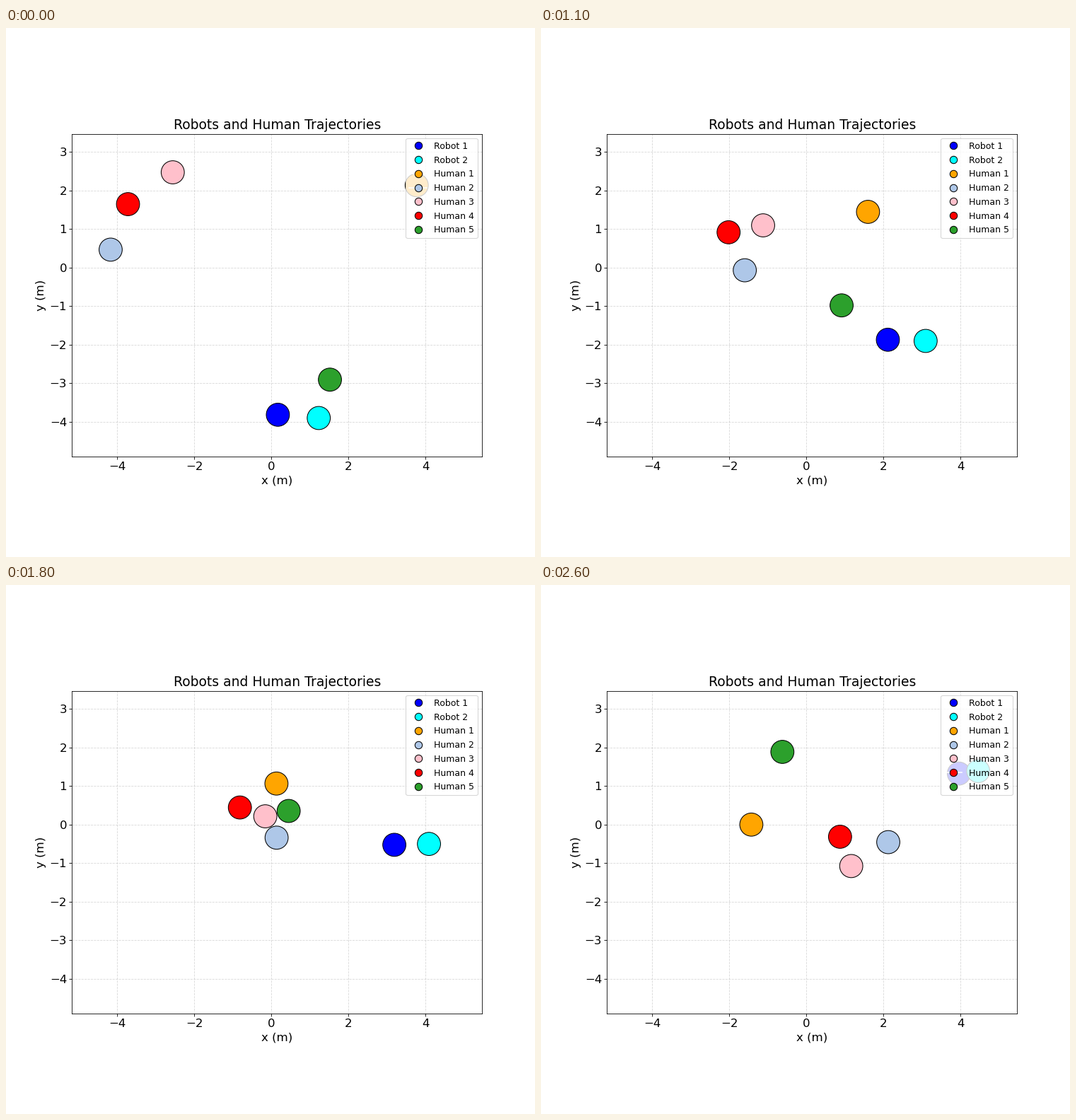
Write a matplotlib script that moves like this. It is 748 by 748 pixels and loops after 2.7 s.

```python
import numpy as np
import matplotlib.pyplot as plt
from matplotlib.animation import FuncAnimation
from matplotlib.lines import Line2D

FRAMES = 27
RADIUS = 0.3
STEP = 0.25                           # metres a robot drives per frame
LAG = 0.6                             # frames a walker loses while starting
DIAGONAL, STEEP, UP = np.radians([45, 67.5, 90])


def drive(start, *legs):
    """Constant-speed path made of (heading, number of steps) legs."""
    heading = np.concatenate([np.full(n, angle) for angle, n in legs])
    moves = STEP * np.column_stack([np.cos(heading), np.sin(heading)])
    return np.vstack([start, start + np.cumsum(moves, axis=0)])


def from_rest(t):
    """Time eased so that speed builds up exponentially from zero."""
    return t - LAG * (1 - np.exp(-t / LAG))


def walk(*points):
    """Smooth path (cubic Hermite) over four key points, starting from rest."""
    p = np.array(points)
    knots = from_rest(np.array([0, 11, 22, 26]))
    v = np.gradient(p, knots, axis=0, edge_order=2)
    t = from_rest(np.arange(FRAMES))
    k = np.clip(np.searchsorted(knots, t, side="right") - 1, 0, len(p) - 2)
    h = (knots[k + 1] - knots[k])[:, None]
    u = (t - knots[k])[:, None] / h
    w = 1 - u
    return (w * w * ((1 + 2 * u) * p[k] + u * h * v[k])
            + u * u * ((1 + 2 * w) * p[k + 1] - w * h * v[k + 1]))


ACTORS = {
    "Robot 1": ("blue", drive((0.17, -3.815), (DIAGONAL, 11), (STEEP, 2),
                              (DIAGONAL, 5), (STEEP, 8))),
    "Robot 2": ("cyan", drive((1.23, -3.9), (DIAGONAL, 10), (STEEP, 4),
                              (DIAGONAL, 5), (UP, 3), (STEEP, 2), (UP, 2))),
    "Human 1": ("orange", walk((3.77, 2.135), (1.60, 1.445),
                               (-0.67, 0.665), (-1.425, 0))),
    "Human 2": ("#aec7e8", walk((-4.165, 0.465), (-1.595, -0.07),
                                (1.13, -0.43), (2.125, -0.455))),
    "Human 3": ("pink", walk((-2.555, 2.47), (-1.12, 1.095),
                             (0.46, -0.37), (1.165, -1.075))),
    "Human 4": ("red", walk((-3.715, 1.645), (-2.015, 0.915),
                            (-0.03, 0.11), (0.875, -0.315))),
    "Human 5": ("#2ca02c", walk((1.52, -2.905), (0.915, -0.98),
                                (0.02, 1.12), (-0.62, 1.885))),
}

plt.rcParams["font.family"] = "DejaVu Sans"
fig, ax = plt.subplots(figsize=(10, 10), dpi=74.8)
fig.subplots_adjust(left=0.1249, right=0.9, bottom=0.11, top=0.88)
ax.set_aspect("equal")
ax.set_xlim(-5.165, 5.465)
ax.set_ylim(-4.897, 3.468)
ax.set_xticks(range(-4, 5, 2))
ax.set_yticks(range(-4, 4))
ax.tick_params(labelsize=16)
ax.set_xlabel("x (m)", fontsize=16)
ax.set_ylabel("y (m)", fontsize=16)
ax.set_title("Robots and Human Trajectories", fontsize=18)
ax.grid(True, linestyle="--", alpha=0.5)

discs, handles = [], []
for name, (color, path) in ACTORS.items():
    discs.append(ax.add_patch(plt.Circle(path[0], RADIUS, facecolor=color,
                                         edgecolor="black", zorder=3)))
    handles.append(Line2D([0], [0], marker="o", color="w", label=name,
                          markersize=10, markerfacecolor=color,
                          markeredgecolor="black"))
ax.legend(handles=handles, loc="upper right", fontsize=12, labelspacing=0.54)


def update(i):
    for disc, (_, path) in zip(discs, ACTORS.values()):
        disc.center = path[i]
    return discs


anim = FuncAnimation(fig, update, frames=FRAMES, interval=100, repeat=True)
plt.show()
```
